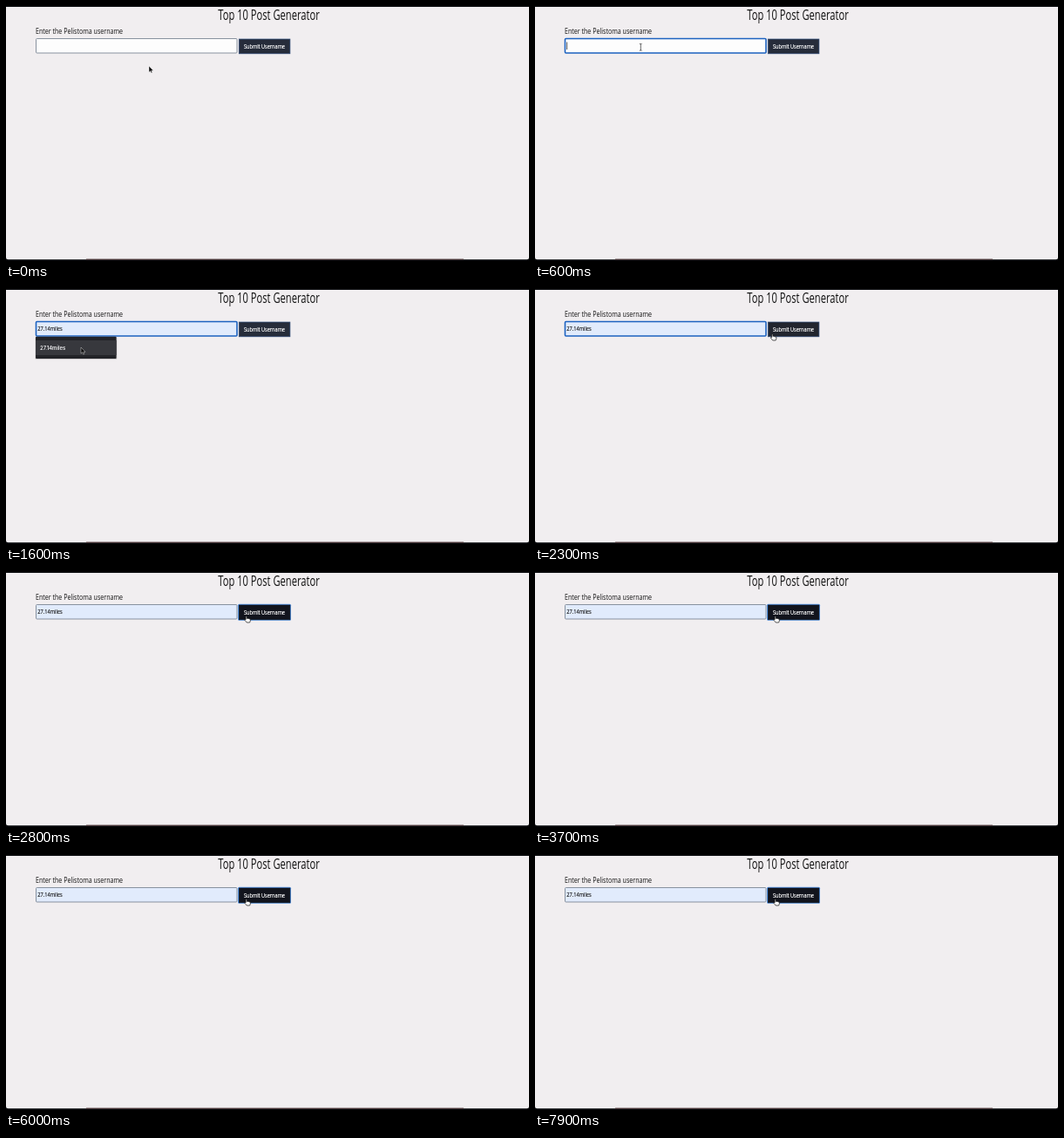
Recreate the animation shown at these times as an HTML page. Size 600x293 px, loop 8000 ms.

```html
<!DOCTYPE html>
<html lang="en">
<head>
<meta charset="utf-8">
<title>Top 10 Post Generator</title>
<style>
  html, body { margin: 0; width: 100%; height: 100%; overflow: hidden; background: #f1eef0; }
  svg { display: block; width: 100vw; height: 100vh; }
  /* one condensed face shared by all page text */
  .narrow { font-family: "Open Sans", "Noto Sans", sans-serif; fill: #111; }
  .menu { font: 600 5.9px Inter, Roboto, sans-serif; fill: #f2f2f4; }
</style>
</head>
<body>
<svg viewBox="0 0 600 293" preserveAspectRatio="none">
  <rect width="600" height="293" fill="#08090c"/>
  <rect y="1" width="600" height="290.3" rx="2.5" fill="#f1eef0"/>
  <rect y="1" width="600" height="6" fill="#f1eef0"/>
  <rect x="92" y="290.6" width="433" height="1.2" fill="#4a3436"/>

  <g class="narrow">
    <text transform="translate(301.5 16) scale(.72 1)" font-size="15.5" text-anchor="middle">Top 10 Post Generator</text>
    <text transform="translate(34 32.4) scale(.72 1)" font-size="9.85">Enter the Pelistoma username</text>
  </g>

  <rect id="field" x="34.5" y="37.5" width="230.5" height="16.5" rx="1"/>
  <text id="value" class="narrow" transform="translate(36.2 48.4) scale(.72 1)" font-size="7.9" stroke="#111" stroke-width=".15"></text>
  <rect id="caret" x="39.5" y="41.5" width=".7" height="8.5" fill="#111"/>

  <rect id="ring" x="266" y="36.8" width="61" height="19" rx="1.5" fill="#5c9df0"/>
  <rect id="button" x="267.3" y="38" width="58.6" height="16.8" stroke-width=".7"/>
  <text class="narrow" transform="translate(296.5 49.3) scale(.72 1)" font-size="7.76" text-anchor="middle" style="fill:#fff" stroke="#fff" stroke-width=".22">Submit Username</text>

  <g id="menu">
    <rect x="33.4" y="55" width="94" height="26" rx="1.5" fill="#000" opacity=".16"/>
    <rect x="34" y="54.8" width="92.6" height="25.2" rx="1" fill="#222327"/>
    <rect id="option" x="34" y="59" width="92.6" height="17" fill="#37383d"/>
    <text class="menu" x="39" y="70">27.14miles</text>
  </g>

  <path id="arrow" d="M0 0V7.2L1.6 5.7L2.7 8.1L3.8 7.6L2.8 5.3H5Z" fill="#0a0a0a" stroke="#fff" stroke-width=".4"/>
  <path id="beam" d="M-1.3 -4Q0 -4 0 -3Q0 -4 1.3 -4M0 -3V3M-1.3 4Q0 4 0 3Q0 4 1.3 4" fill="none" stroke="#222" stroke-width=".7"/>
  <path id="hand" d="M.1 .6Q.7 -.3 1.4 .6V2.8Q2.2 2.2 2.8 3Q3.6 2.5 4.2 3.3Q5.4 3 5.4 4.3Q5.4 6 4.6 7.4H1.2Q0 5.8 -1.2 4.6Q-1.2 3.5 .1 4.2Z" fill="#fff" stroke="#0a0a0a" stroke-width=".7"/>
</svg>
<script>
const LOOP = 8000, STEP = 100;
const NAME = "27.14miles";
const el = id => document.getElementById(id);
const show = (id, on) => el(id).setAttribute("display", on ? "inline" : "none");
const set = (id, attrs) => {
  for (const key in attrs) el(id).setAttribute(key, attrs[key]);
};

// pointer stops: time, x, y
const path = [
  [0, 164, 69], [100, 160, 66], [400, 123, 47], [1200, 112, 49],
  [1500, 86, 67], [1800, 86, 67], [2200, 270, 52], [2300, 271.5, 51.6],
  [2700, 275, 50.6], [LOOP, 275, 50.6]
];

function pointerAt(t) {
  const i = path.findIndex(p => p[0] > t);
  const [t0, x0, y0] = path[i - 1], [t1, x1, y1] = path[i];
  const k = (t - t0) / (t1 - t0), e = k * k * (3 - 2 * k);
  return [x0 + (x1 - x0) * e, y0 + (y1 - y0) * e];
}

function draw(t) {
  const [x, y] = pointerAt(t);
  const inField = x > 34 && x < 265 && y > 37 && y < 54;
  const overButton = x > 267 && y < 55;
  const typing = t >= 800 && t < 1300;
  const focused = t >= 500 && t < 2700;
  const pressed = t >= 2700;
  const menu = t >= 900 && t < 1900;
  const hovered = t >= 1500 && t < 1900;
  const filled = t >= 1500;

  set("field", {
    fill: filled ? "#e1ebfc" : "#fdfdfd",
    stroke: focused ? "#1c62c0" : "#7c8796",
    "stroke-width": focused ? 1.6 : .9
  });
  el("value").textContent = filled ? NAME : t >= 900 ? NAME[0] : "";
  set("caret", { x: t >= 900 ? 39.4 : 36.4 });
  show("caret", focused && !filled);

  set("button", {
    fill: pressed ? "#12141d" : overButton ? "#22252e" : "#262c3a",
    stroke: pressed ? "#12141d" : "#2d4a78"
  });
  show("ring", pressed);
  show("menu", menu);
  show("option", hovered);

  const kind = typing ? "" : overButton ? "hand" : inField ? "beam" : "arrow";
  for (const id of ["arrow", "beam", "hand"]) {
    show(id, id === kind);
    set(id, { transform: `translate(${x} ${y})` });
  }
}

const start = performance.now();
function tick() {
  const t = (performance.now() - start) % LOOP;
  draw(Math.floor(t / STEP) * STEP);
  requestAnimationFrame(tick);
}
tick();
</script>
</body>
</html>
```
